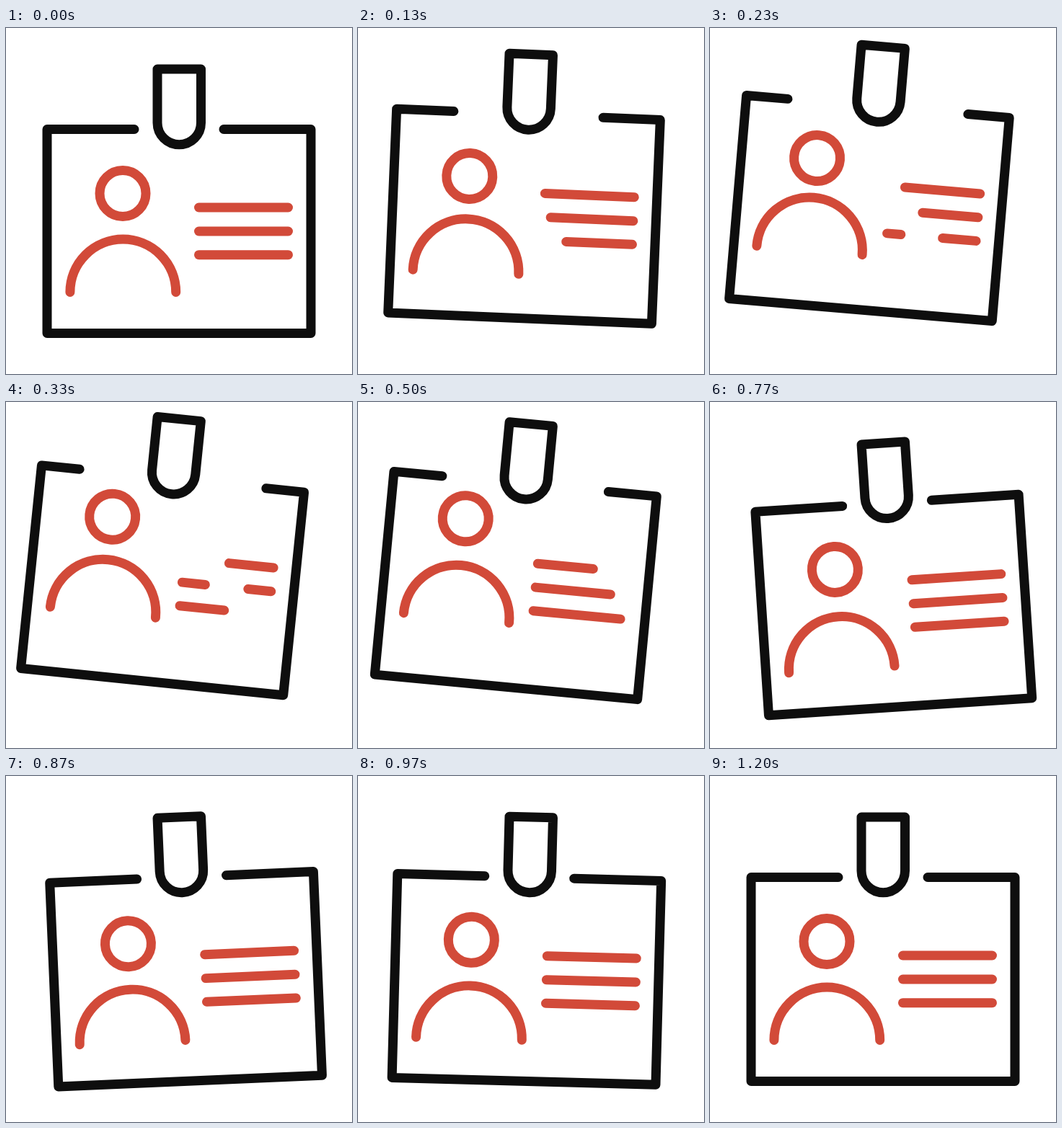
These frames come from a looping animation (480x480 px, 1530 ms). An HTML page with a canvas:

```html
<!DOCTYPE html>
<html lang="en">
<head>
<meta charset="utf-8">
<title>ID badge</title>
<style>
  html, body { margin: 0; overflow: hidden; background: #fff; }
  canvas { display: block; }
</style>
</head>
<body>
<canvas id="stage" width="480" height="480"></canvas>
<script>
const ctx = document.getElementById('stage').getContext('2d');
const LOOP = 1530, TICK = 100 / 3, LAST_TICK = 36;
const BLACK = '#0e0e0e', RED = '#d24a39';

// Progress 0..1 between two ticks, eased by cubic-bezier(a, 0, b, 1).
function ramp(n, from, to, a = 1 / 3, b = 2 / 3) {
  const x = (n - from) / (to - from);
  if (x <= 0) return 0;
  if (x >= 1) return 1;
  let lo = 0, hi = 1;
  for (let i = 0; i < 24; i++) {
    const t = (lo + hi) / 2, u = 1 - t;
    if (3 * a * t * u * u + 3 * b * t * t * u + t ** 3 < x) lo = t; else hi = t;
  }
  return lo * lo * (3 - 2 * lo);
}

function stroke(color, build) {
  ctx.strokeStyle = color;
  ctx.beginPath();
  build();
  ctx.stroke();
}

function polyline(color, ...points) {
  stroke(color, () => points.forEach(([x, y]) => ctx.lineTo(x, y)));
}

// A line is erased from the left while it is drawn again behind the gap.
function textLine(y, n, delay) {
  const left = 267.5, width = 124, shortest = 0.08;
  const erased = ramp(n, delay, delay + 12);
  const drawn = ramp(n, delay + 4, delay + 16);
  const piece = (from, to) => {
    if (to - from > shortest) polyline(RED, [left + width * from, y], [left + width * to, y]);
  };
  piece(0, drawn);
  piece(erased, 1);
}

function draw(n) {
  const raised = ramp(n, 0, 10, 1 / 3, 0.25) - ramp(n, 10, 20, 0.8, 2 / 3);
  const angle = 6 * ramp(n, 0, 12, 1 / 3, 0.35) - 10 * ramp(n, 12, 24, 0.65, 2 / 3)
    + 6 * ramp(n, 24, 30) - 2 * ramp(n, 30, 36);
  const gap = 62 + 68 * raised;
  const headUp = 33.3 * (ramp(n, 4, 12) - ramp(n, 17, 24));
  const bodyUp = 33 * (ramp(n, 2, 11) - ramp(n, 14, 23));

  ctx.fillStyle = '#fff';
  ctx.fillRect(0, 0, 480, 480);
  ctx.save();
  ctx.lineWidth = 13;
  ctx.lineCap = ctx.lineJoin = 'round';
  ctx.translate(240, 57 - 33.5 * raised);
  ctx.rotate(angle * Math.PI / 180);
  ctx.translate(-240, -57);

  polyline(BLACK, [240 - gap, 140.5], [57, 140.5], [57, 423.5], [423, 423.5], [423, 140.5], [240 + gap, 140.5]);
  stroke(BLACK, () => {
    ctx.moveTo(210, 57);
    ctx.lineTo(270.5, 57);
    ctx.arc(240.25, 131.5, 30.25, 0, Math.PI);
    ctx.closePath();
  });

  stroke(RED, () => ctx.arc(162, 229.5 - headUp, 32, 0, 2 * Math.PI));
  stroke(RED, () => ctx.arc(162.3, 366.5 - bodyUp, 73.4, Math.PI, 2 * Math.PI));
  textLine(249, n, 4);
  textLine(282, n, 2);
  textLine(314.7, n, 0);
  ctx.restore();
}

function play(now) {
  const time = now % LOOP;
  draw(Math.min(LAST_TICK, Math.floor((time + 3.4) / TICK)));
  requestAnimationFrame(play);
}
play(0);
</script>
</body>
</html>
```
